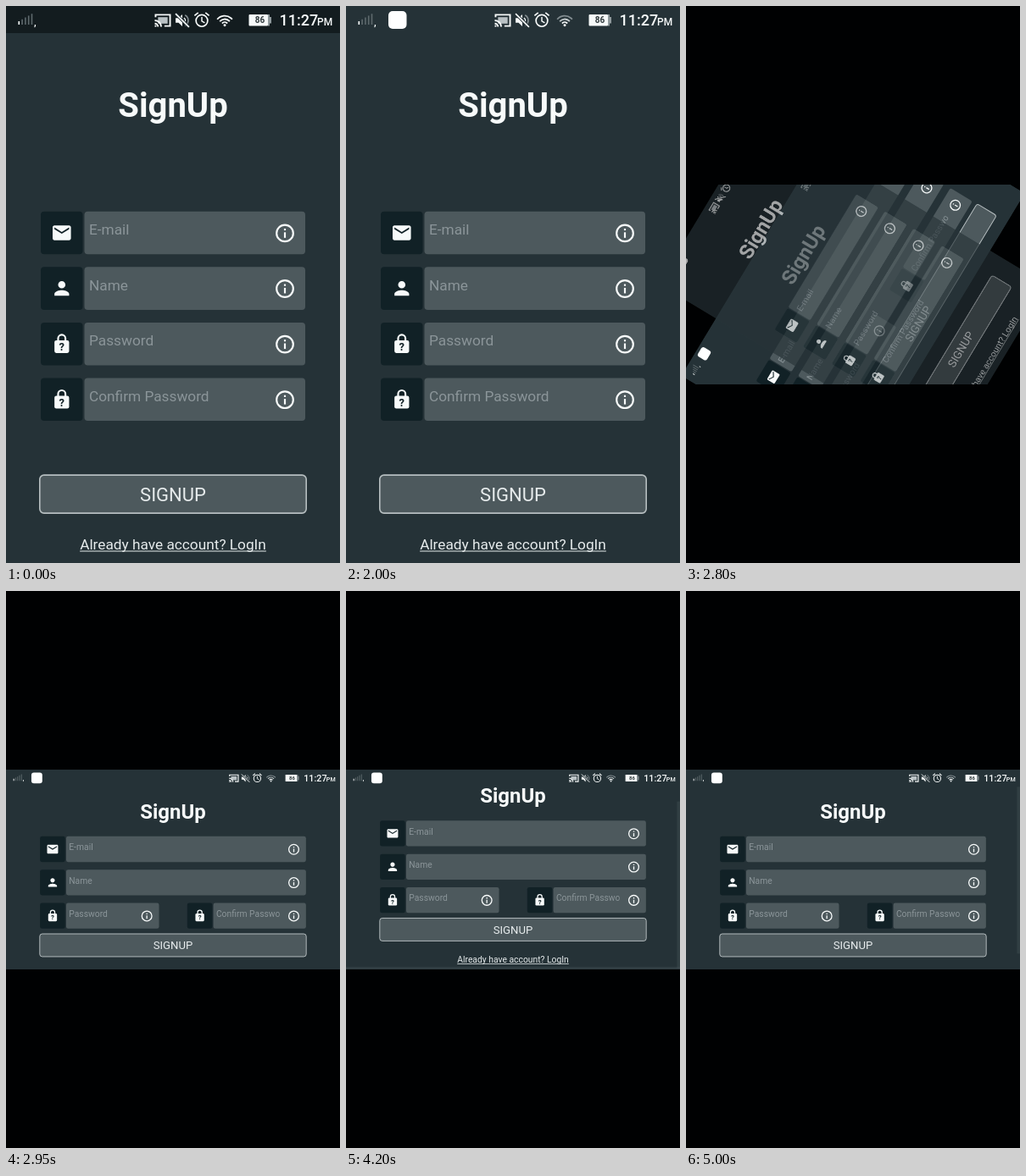
Recreate the animation shown at these times as an HTML page with a canvas. Size 394x658 px, loop 5100 ms.

```html
<!DOCTYPE html>
<html lang="en">
<head>
<meta charset="utf-8">
<title>Sign up, portrait and landscape</title>
<style>
  html, body { margin: 0; width: 100%; height: 100%; overflow: hidden; background: #000; }
  canvas { display: block; width: 394px; height: 658px; }
</style>
</head>
<body>
<canvas id="stage"></canvas>
<script>
const W = 394, H = 658, LOOP = 5100, STEP = 50;
const S = W / H;                      // the phone lies on its side inside the stage
const LAND = { x: 0, y: 211, w: W, h: W * S };
const FONT = 'Roboto, "Noto Sans", sans-serif';
const C = {
  body: '#253237', bar: '#131c1f', field: '#4d595d', tile: '#112126',
  hint: '#8b9599', white: '#f7fafa', soft: '#e6ebec', edge: '#b7bfc1', dim: '#828c90'
};

const canvas = document.getElementById('stage');
const g = canvas.getContext('2d');
const dpr = window.devicePixelRatio || 1;
canvas.width = Math.round(W * dpr);
canvas.height = Math.round(H * dpr);

const clamp = v => Math.max(0, Math.min(1, v));
const part = (t, a, b) => clamp((t - a) / (b - a));
const easeOut = p => 1 - (1 - p) * (1 - p);
const easeBoth = p => (1 - Math.cos(Math.PI * p)) / 2;

const MAIL = new Path2D('M20 4H4c-1.1 0-1.99.9-1.99 2L2 18c0 1.1.9 2 2 2h16c1.1 0 2-.9 2-2V6c0-1.1-.9-2-2-2zm0 4l-8 5-8-5V6l8 5 8-5v2z');
const PERSON = new Path2D('M12 12c2.21 0 4-1.79 4-4s-1.79-4-4-4-4 1.79-4 4 1.79 4 4 4zm0 2c-2.67 0-8 1.34-8 4v2h16v-2c0-2.66-5.33-4-8-4z');

function scoped(draw) {
  g.save();
  draw();
  g.restore();
}

function box(x, y, w, h, r, fill) {
  g.beginPath();
  g.roundRect(x, y, w, h, r);
  g.fillStyle = fill;
  g.fill();
}

function line(points, color, width) {
  g.beginPath();
  points.forEach(([x, y], i) => i ? g.lineTo(x, y) : g.moveTo(x, y));
  g.strokeStyle = color;
  g.lineWidth = width;
  g.stroke();
}

function arc(x, y, r, a, b, color, width) {
  g.beginPath();
  g.arc(x, y, r, a, b);
  g.strokeStyle = color;
  g.lineWidth = width;
  g.stroke();
}

function text(str, x, y, size, color, align = 'left', weight = 400) {
  g.font = `${weight} ${size}px ${FONT}`;
  g.textAlign = align;
  g.fillStyle = color;
  g.fillText(str, x, y);
}

// Runs a drawing made for a 24-unit grid, centred on a point
function icon(x, y, k, draw) {
  scoped(() => {
    g.translate(x, y);
    g.scale(k, k);
    g.translate(-12, -12);
    g.fillStyle = C.white;
    draw();
  });
}

const mail = () => g.fill(MAIL);
const person = () => g.fill(PERSON);

function lock() {
  g.beginPath();
  g.moveTo(8, 9);
  g.lineTo(8, 6);
  g.arc(12, 6, 4, Math.PI, 0);
  g.lineTo(16, 9);
  g.strokeStyle = C.white;
  g.lineWidth = 2;
  g.stroke();
  box(4, 8, 16, 14, 2, C.white);
  text('?', 12, 19.4, 12, C.tile, 'center', 700);
}

function info() {
  arc(12, 12, 9, 0, 2 * Math.PI, C.white, 2);
  box(11, 7, 2, 2, 0, C.white);
  box(11, 11, 2, 6, 0, C.white);
}

function cast() {
  line([[3, 8], [3, 5], [21, 5], [21, 19], [14, 19]], C.white, 2);
  box(6, 8, 12, 8, 0, '#b9c1c4');
  g.clearRect;
  for (const r of [4, 8]) arc(2, 20, r, -Math.PI / 2, 0, C.white, 2);
  box(2, 18, 2, 2, 0, C.white);
}

function mute() {
  g.beginPath();
  g.moveTo(3, 9); g.lineTo(7, 9); g.lineTo(12, 4);
  g.lineTo(12, 20); g.lineTo(7, 15); g.lineTo(3, 15);
  g.fill();
  arc(12, 12, 4, -1, 1, C.white, 1.6);
  arc(12, 12, 8, -1.1, 1.1, C.dim, 1.8);
  line([[3, 3], [21, 21]], C.body, 4);
  line([[3, 3], [21, 21]], C.white, 1.8);
}

function alarm() {
  arc(12, 13, 8, 0, 2 * Math.PI, C.white, 2);
  line([[12, 8], [12, 13.5], [16, 16]], C.white, 1.7);
  line([[2, 6], [7, 2]], C.white, 2);
  line([[22, 6], [17, 2]], C.white, 2);
}

function wifi(weak) {
  const a = -Math.PI * 0.78, b = -Math.PI * 0.22;
  arc(12, 20, 14, a, b, weak ? C.dim : C.white, 2.2);
  arc(12, 20, 9.2, a, b, weak ? '#c3cacc' : C.white, 2.2);
  arc(12, 20, 4.8, a, b, C.white, 2.2);
  g.beginPath();
  g.arc(12, 19.5, 1.8, 0, 2 * Math.PI);
  g.fill();
}

function statusBar(w, shown, weak) {
  if (shown < 1) scoped(() => {
    g.globalAlpha = 1 - shown;
    box(0, 0, w, 32, 0, C.bar);
  });
  for (let i = 0; i < 5; i++) {
    const h = 4 + i * 2.2;
    box(14.5 + i * 3.8, 22 - h, 1.6, h, 0, i ? '#5e696d' : C.white);
  }
  text(',', 33, 22.5, 11, C.white, 'left', 700);
  if (shown > 0) scoped(() => {
    g.globalAlpha = shown;
    box(50, 6, 21.5, 21, 5, '#fff');
  });

  const right = w - 394;
  scoped(() => {
    g.translate(right, 0);
    icon(185, 17, 0.95, cast);
    icon(208, 17, 0.88, mute);
    icon(231, 16.5, 0.86, alarm);
    icon(258, 16.5, 0.82, () => wifi(weak));
    box(286.5, 10, 22.5, 13.5, 1, C.white);
    box(309, 10, 2, 13.5, 0, '#8f999c');
    box(311, 13, 2, 7.5, 0, '#8f999c');
    text('86', 299.5, 20.3, 10, '#30393c', 'center', 700);
    text('11:27', 322.5, 23.3, 18, C.white, 'left', 500);
    text('PM', 367, 23.3, 12, C.white, 'left', 500);
  });
}

function field(x, right, mid, label, glyph) {
  const top = mid - 25.3;
  box(x, top, 49.5, 50.6, 4, C.tile);
  box(x + 51.5, top, right - x - 51.5, 50.6, 4, C.field);
  icon(x + 24.8, mid, 1.08, glyph);
  icon(right - 24, mid + 0.4, 1.09, info);
  scoped(() => {
    g.beginPath();
    g.rect(x + 51.5, top, right - 52 - x - 51.5, 50.6);
    g.clip();
    text(label, x + 57, mid + 2.2, 17.25, C.hint);
  });
}

function footer(x, right, mid, center) {
  box(x, mid - 22.5, right - x, 45, 5, C.field);
  g.beginPath();
  g.roundRect(x, mid - 22.5, right - x, 45, 5);
  g.strokeStyle = C.edge;
  g.lineWidth = 1.6;
  g.stroke();
  text('SIGNUP', center, mid + 8.3, 22, C.soft, 'center');
  const link = 'Already have account? LogIn';
  text(link, center, mid + 65.5, 17.25, C.soft, 'center');
  const half = g.measureText(link).width / 2;
  box(center - half, mid + 66.8, 2 * half, 1.2, 0, C.soft);
}

function portrait(shown, weak) {
  box(0, 0, W, H, 0, C.body);
  statusBar(W, shown, weak);
  text('SignUp', W / 2, 130.8, 40, C.white, 'center', 700);
  const rows = [['E-mail', mail], ['Name', person], ['Password', lock], ['Confirm Password', lock]];
  rows.forEach(([label, glyph], i) => field(41, 353, 268 + i * 65.6, label, glyph));
  footer(39.8, 354.2, 576.6, W / 2);
}

function landscape(scroll, bar, glow) {
  box(0, 0, H, W, 0, C.body);
  scoped(() => {
    g.beginPath();
    g.rect(0, 32, H, W - 32);
    g.clip();
    g.translate(0, -scroll);
    text('SignUp', H / 2, 96.5, 40, C.white, 'center', 700);
    field(67, 591, 157, 'E-mail', mail);
    field(67, 591, 222.7, 'Name', person);
    field(67, 301.5, 288.4, 'Password', lock);
    field(357, 591, 288.4, 'Confirm Password', lock);
    footer(66.5, 591.5, 346.5, H / 2);
  });
  if (bar > 0) box(H - 6, 34 + scroll * 0.93, 6, 329, 0, `rgba(130,145,150,${0.13 * bar})`);
  if (glow > 0) box(0, W - 5, H, 5, 0, `rgba(130,150,155,${0.12 * glow})`);
  statusBar(H, 1, true);
}

// Paints a screen of w by h units around the middle of the stage, turned by an angle
function turned(angle, w, h, alpha, draw) {
  scoped(() => {
    g.globalAlpha = alpha;
    g.translate(LAND.x + LAND.w / 2, LAND.y + LAND.h / 2);
    g.rotate(angle);
    g.scale(S, S);
    g.translate(-w / 2, -h / 2);
    g.beginPath();
    g.rect(0, 0, w, h);
    g.clip();
    draw();
  });
}

function sideways(t) {
  box(0, 0, W, H, 0, '#000102');
  g.beginPath();
  g.rect(LAND.x, LAND.y, LAND.w, LAND.h);
  g.clip();

  const spin = easeBoth(part(t, 2700, 2950));
  const angle = -Math.PI / 2 * (1 - spin);
  if (spin > 0) {
    const down = easeOut(part(t, 4050, 4200));
    const up = easeOut(part(t, 4550, 4750));
    const fade = 1 - part(t, 4250, 4450);
    const bar = t < 4100 ? 0 : t < 4600 ? fade : 1;
    const glow = t < 4200 || t >= 4600 ? 0 : fade;
    turned(angle, H, W, 1, () => landscape(31 * (down - up), bar, glow));
  }
  if (spin < 1) {
    // flatten the fading screen first so overlapping parts fade as one
    if (spin === 0) turned(angle, W, H, 1, () => portrait(1, true));
    else turned(angle, W, H, 1 - spin, () => g.drawImage(still, 0, 0, W, H));
  }
}

let still = null;
function snapshot() {
  scoped(() => {
    g.setTransform(dpr, 0, 0, dpr, 0, 0);
    portrait(1, true);
  });
  still = document.createElement('canvas');
  still.width = canvas.width;
  still.height = canvas.height;
  still.getContext('2d').drawImage(canvas, 0, 0);
}

function paint(now) {
  const t = Math.floor((now % LOOP) / STEP) * STEP;
  g.setTransform(dpr, 0, 0, dpr, 0, 0);
  scoped(() => {
    if (t < 2050) portrait(t < 50 ? 0 : t < 150 ? 0.5 : 1, t >= 1600);
    else sideways(t);
  });
}

snapshot();
const start = performance.now();
function tick() {
  paint(performance.now() - start);
  requestAnimationFrame(tick);
}
paint(0);
requestAnimationFrame(tick);
</script>
</body>
</html>
```
